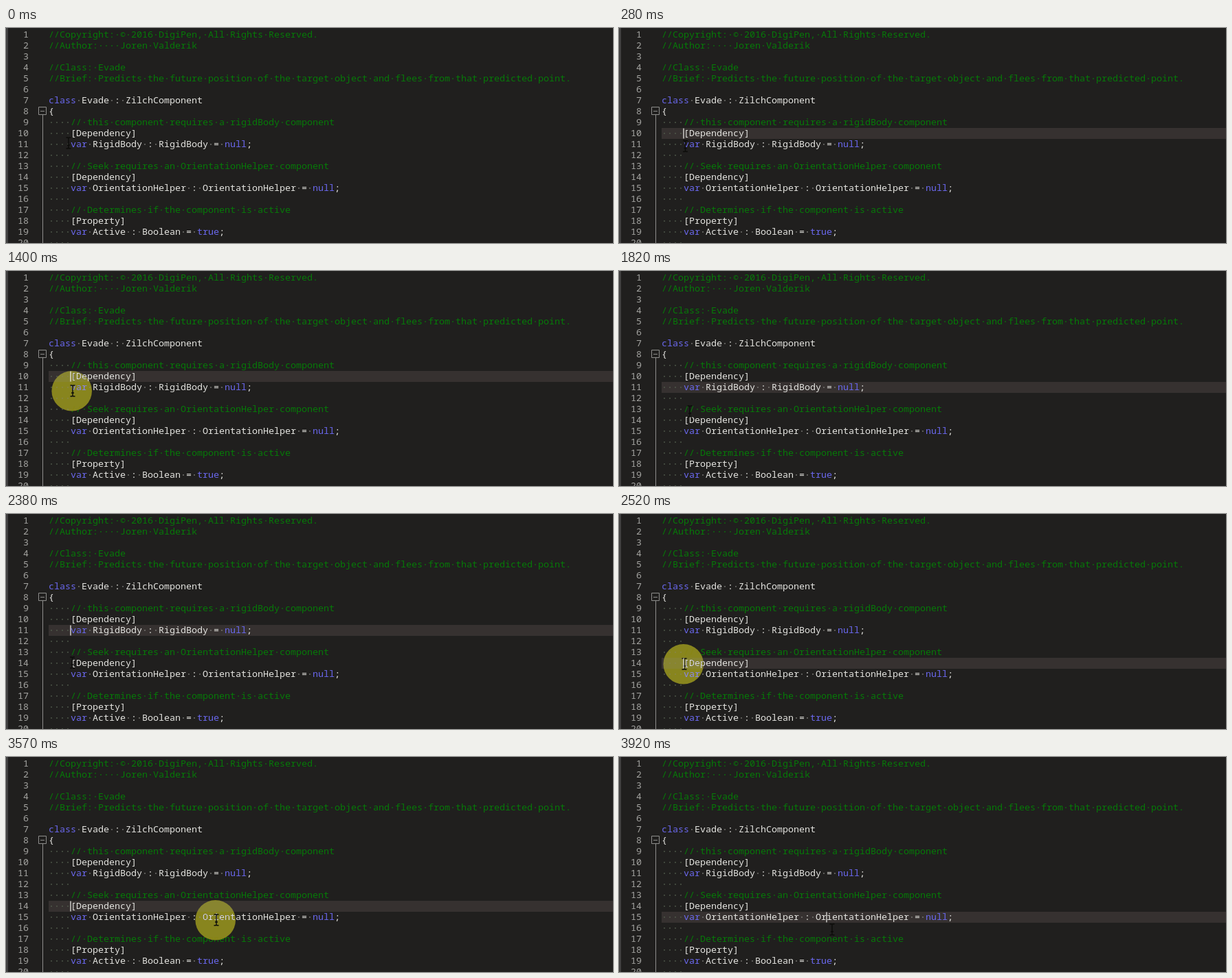
Write an HTML page that moves like this. It is 883 px wide and 314 px high and loops after 3990 ms.

```html
<!DOCTYPE html>
<html lang="en">
<head>
<meta charset="utf-8">
<title>Code editor</title>
<style>
  html, body { margin: 0; width: 100%; height: 100%; overflow: hidden; background: #201f1e; }
  svg { display: block; width: 100vw; height: 100vh; }
  text { font: 13.333px "Noto Sans Mono", "Liberation Mono", monospace; white-space: pre; }
  .plain { fill: #e4e4e0; }
  .key { fill: #6a68ee; }
  .note { fill: #067a08; }
  .num { fill: #a3a3a0; text-anchor: end; }
  #halo { mix-blend-mode: lighten; }
</style>
</head>
<body>
<svg id="stage" viewBox="0 0 883 314" xmlns="http://www.w3.org/2000/svg">
  <rect width="883" height="314" fill="#201f1e"/>
  <rect width="3" height="314" fill="#414040"/>
  <rect id="row" x="62" width="821" height="16" fill="#363130"/>
  <g id="code"></g>
  <path d="M47.5 115.5h11v11h-11zM50 121.5h6M53.5 127V314" fill="none" stroke="#8e8e8c"/>
  <circle id="halo" r="29.3" fill="#888516"/>
  <path id="beam" d="M-3.5 -8h2.5l1 1l1 -1h2.5M0 -7V7M-3.5 8h2.5l1 -1l1 1h2.5M-2 3h4" fill="none" stroke="#0c0c0a" stroke-width="1.4"/>
  <rect id="caret" width="1.2" height="15" fill="#f0f0ec"/>
</svg>
<script>
const LEFT = 62, COL = 8, ROW = 16, LOOP = 3990, TICK = 70;
const $ = id => document.getElementById(id);

// A hash stands for the two slashes that open a note
const lines = `#Copyright: © 2016 DigiPen, All Rights Reserved.
#Author:    Joren Valderik

#Class: Evade
#Brief: Predicts the future position of the target object and flees from that predicted point.

class Evade : ZilchComponent
{
    # this component requires a rigidBody component
    [Dependency]
    var RigidBody : RigidBody = null;
    
    # Seek requires an OrientationHelper component
    [Dependency]
    var OrientationHelper : OrientationHelper = null;
    
    # Determines if the component is active
    [Property]
    var Active : Boolean = true;
    `.replaceAll("#", "/".repeat(2)).split("\n");

function add(tag, attrs, content) {
  const el = document.createElementNS($("stage").namespaceURI, tag);
  for (const name in attrs) el.setAttribute(name, attrs[name]);
  if (content) el.textContent = content;
  $("code").append(el);
}

function drawLine(line, i) {
  const base = 14 + i * ROW;
  add("text", { x: 33, y: base, class: "num" }, String(i + 1));
  const noteAt = line.indexOf("/");
  const indent = line.search(/\S|$/);
  for (const m of line.matchAll(/ |\w+|[^\w ]+/g)) {
    const x = LEFT + m.index * COL;
    const inNote = noteAt >= 0 && m.index >= noteAt;
    if (m[0] === " ") {
      const fill = m.index < indent ? "#55604f" : inNote ? "#0b720c" : "#80807c";
      add("rect", { x: x + 3.3, y: base - 5, width: 1.4, height: 1.8, fill });
    } else {
      const key = /^(class|var|null|true)$/.test(m[0]);
      add("text", { x, y: base, class: inNote ? "note" : key ? "key" : "plain" }, m[0]);
    }
  }
}
lines.forEach(drawLine);

// Pointer stops: time, x, y
const path = [
  [0, 91, 168], [70, 95, 158], [210, 95, 158], [350, 98, 187], [980, 98, 187],
  [1260, 97, 175], [1540, 97, 175], [1820, 103, 205], [1890, 103, 205],
  [2100, 101, 211], [2170, 101, 211], [2450, 95, 219], [2590, 95, 219],
  [3010, 182, 228], [3430, 306, 238], [3780, 306, 238], [3920, 310, 252]
];
// Presses: on, off, time the caret lands, line, column
const clicks = [
  [70, 210, 140, 10, 4], [1400, 1540, 1470, 11, 4],
  [2450, 2590, 2520, 14, 4], [3570, 3710, 3640, 15, 30]
];
const blinks = [[140, 630], [1120, 1680], [2240, 2730], [3290, LOOP]];

function pointer(t) {
  const n = path.findIndex(p => p[0] > t);
  if (n < 0) return path[path.length - 1].slice(1);
  const [t0, x0, y0] = path[n - 1], [t1, x1, y1] = path[n];
  const k = (t - t0) / (t1 - t0);
  return [x0 + (x1 - x0) * k, y0 + (y1 - y0) * k];
}

const within = ([a, b], t) => t >= a && t < b;
const show = (id, on) => $(id).setAttribute("visibility", on ? "visible" : "hidden");
const move = (id, x, y) => $(id).setAttribute("transform", `translate(${x} ${y})`);

function render(time) {
  const t = Math.floor(time % LOOP / TICK) * TICK;
  const [x, y] = pointer(t);
  move("beam", x, y);
  move("halo", x - 1.3, y + 0.3);
  show("halo", clicks.some(c => within(c, t)));

  const spot = clicks.filter(c => c[2] <= t).pop();
  show("row", spot);
  show("caret", spot && blinks.some(b => within(b, t)));
  if (spot) {
    const top = 2 + (spot[3] - 1) * ROW;
    move("row", 0, top);
    move("caret", LEFT + spot[4] * COL - 0.6, top + 0.5);
  }
}

let start;
function loop(now) {
  start ??= now;
  render(Math.max(0, now - start));
  requestAnimationFrame(loop);
}
render(0);
requestAnimationFrame(loop);
</script>
</body>
</html>
```
